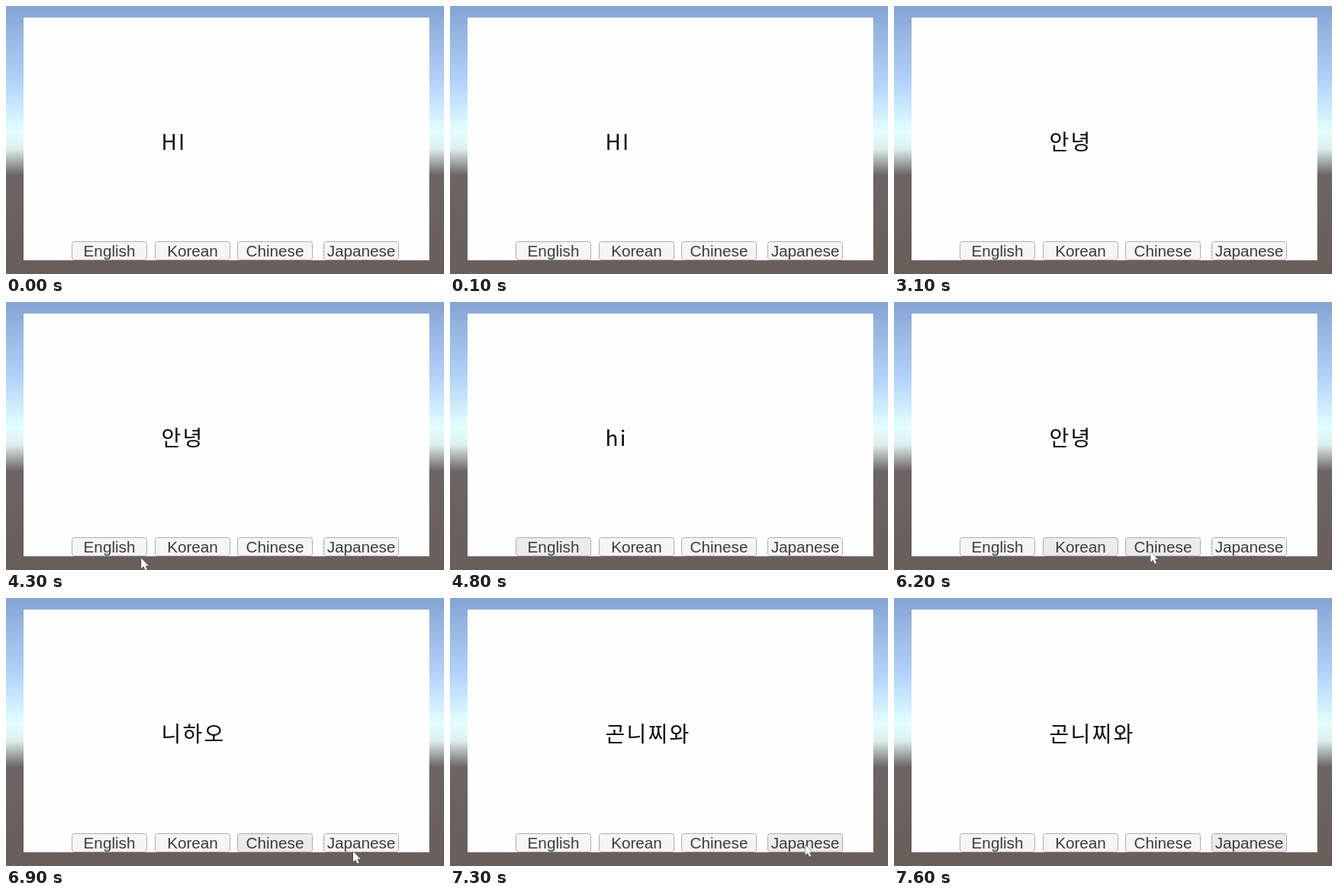
Recreate the animation shown at these times as an HTML page with a canvas. Size 574 by 352 pixels, loop 8 s.

```html
<!DOCTYPE html>
<html lang="en">
<head>
<meta charset="utf-8">
<title>Language buttons</title>
<style>
html, body { margin: 0; width: 100%; height: 100%; overflow: hidden; background: #685e5a; }
canvas { display: block; width: 574px; height: 352px; }
</style>
</head>
<body>
<canvas id="stage" width="574" height="352"></canvas>
<script>
const ctx = document.getElementById('stage').getContext('2d');
const LOOP = 8000, STEP = 100;
const BOX = { y: 309, w: 99, h: 25 };

// The pointer enters at `from`, clicks the button, then leaves downwards until `end`.
const buttons = [
  { label: 'English', x: 86, word: 'hi', start: 4100, click: 4600, end: 4800, from: [205, 345] },
  { label: 'Korean', x: 195, word: '안녕', start: 5200, click: 5500, end: 5600, from: [128, 326] },
  { label: 'Chinese', x: 303, word: '니하오', start: 6000, click: 6400, end: 6500, from: [320, 332] },
  { label: 'Japanese', x: 416, word: '곤니찌와', start: 6900, click: 7300, end: 7600, from: [455, 333] }
];

const sky = ctx.createLinearGradient(0, 0, 0, 352);
sky.addColorStop(0, '#86a4d2');
sky.addColorStop(0.28, '#b1d2fa');
sky.addColorStop(0.47, '#e3ffff');
sky.addColorStop(0.535, '#dcecec');
sky.addColorStop(0.63, '#6c6563');
sky.addColorStop(1, '#685e5a');

const lerp = (a, b, p) => a + (b - a) * p;
const clamp = p => Math.max(0, Math.min(1, p));

function pointerAt(t) {
  const b = buttons.find(b => t >= b.start && t < b.end);
  if (!b) return null;
  const p = clamp((t - b.start) / (b.click - b.start));
  const drop = clamp((t - b.click) / (b.end - b.click));
  return {
    x: lerp(b.from[0], b.x + BOX.w / 2, p),
    y: lerp(b.from[1], 324, p) + 20 * drop
  };
}

function greeting(t) {
  const clicked = buttons.filter(b => t >= b.click).pop();
  return clicked ? clicked.word : t < 3100 ? 'HI' : '안녕';
}

function drawButton(b, t, selected, pointer) {
  const over = pointer && Math.abs(pointer.x - b.x - BOX.w / 2) < BOX.w / 2 &&
    pointer.y > BOX.y && pointer.y < BOX.y + BOX.h - 1;
  const pressed = b === selected && t < b.click;
  ctx.fillStyle = pressed ? '#c8c8c8' : over || b === selected ? '#ebebeb' : '#f5f5f5';
  ctx.strokeStyle = '#acacac';
  ctx.beginPath();
  ctx.roundRect(b.x + 0.5, BOX.y + 0.5, BOX.w - 1, BOX.h - 1, 3);
  ctx.fill();
  ctx.stroke();

  ctx.fillStyle = '#3c3c3c';
  ctx.font = '20.7px "Liberation Sans", Arial, sans-serif';
  ctx.letterSpacing = '0px';
  ctx.textAlign = 'center';
  ctx.fillText(b.label, b.x + BOX.w / 2, 329);
}

function drawPointer({ x, y }) {
  const arrow = new Path2D('M0 0V13.5L3.1 10.7L5.4 15.7L7.7 14.6L5.4 9.9H9.6Z');
  ctx.save();
  ctx.translate(x, y);
  ctx.fillStyle = '#fff';
  ctx.strokeStyle = '#444';
  ctx.stroke(arrow);
  ctx.fill(arrow);
  ctx.restore();
}

function draw(t) {
  const pointer = pointerAt(t);
  const selected = buttons.filter(b => t >= b.click - STEP).pop();

  ctx.fillStyle = sky;
  ctx.fillRect(0, 0, 574, 352);
  ctx.fillStyle = '#fefefe';
  ctx.fillRect(23, 15.3, 531.7, 318.7);

  ctx.fillStyle = '#080808';
  ctx.font = '28px "Noto Sans CJK KR", "Noto Sans CJK", sans-serif';
  ctx.letterSpacing = '2.3px';
  ctx.textAlign = 'left';
  ctx.fillText(greeting(t), 203.4, 188.8);

  buttons.forEach(b => drawButton(b, t, selected, pointer));
  if (pointer) drawPointer(pointer);
}

const begin = performance.now();
function tick() {
  const t = (performance.now() - begin) % LOOP;
  draw(Math.floor(t / STEP) * STEP);
  requestAnimationFrame(tick);
}
tick();
</script>
</body>
</html>
```
